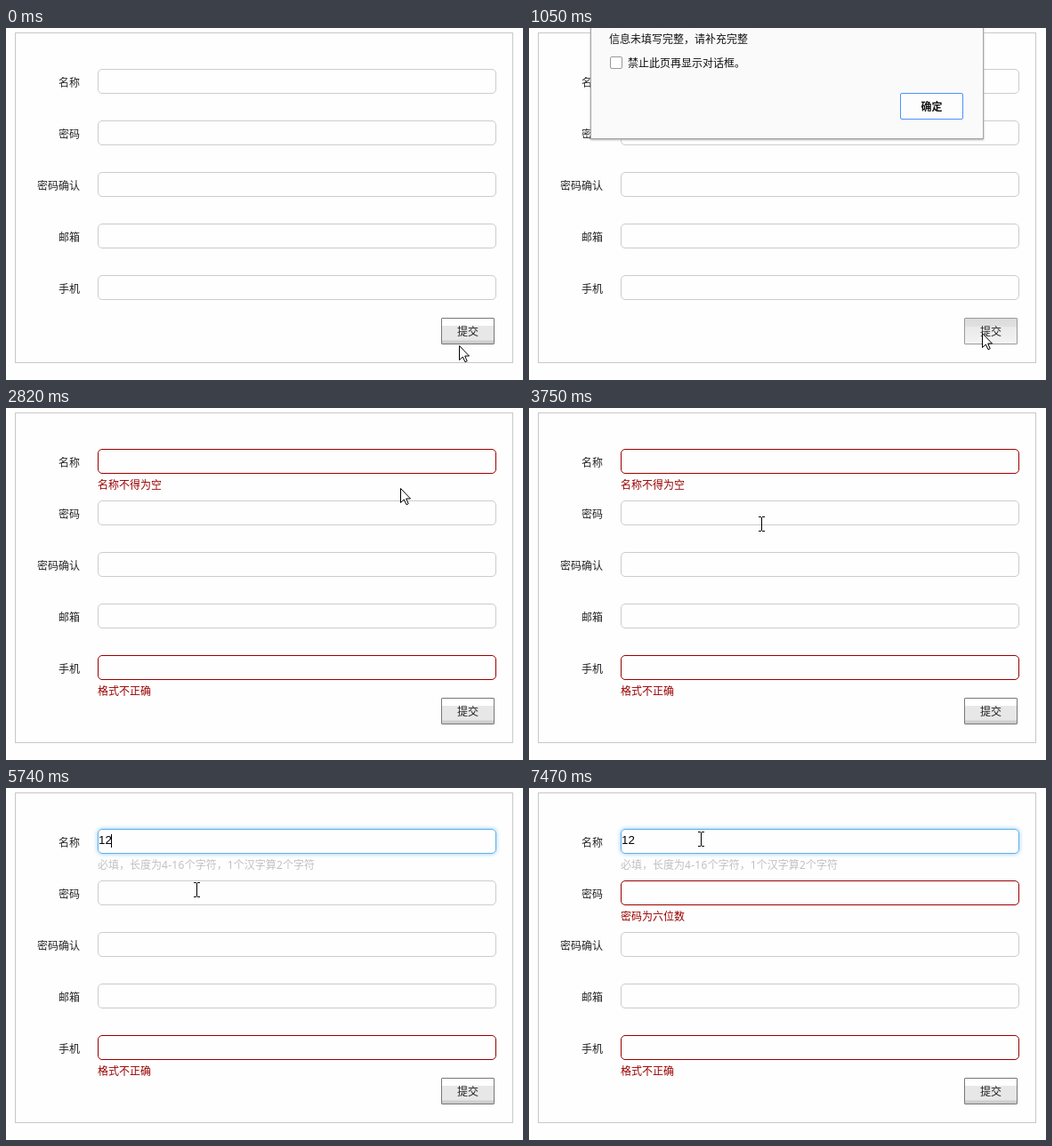
Write an HTML page that moves like this. It is 581 by 396 pixels and loops after 8000 ms.

```html
<!DOCTYPE html>
<html lang="zh-CN">
<head>
<meta charset="utf-8">
<style>
html, body { margin: 0; width: 100%; height: 100%; overflow: hidden; background: #fefefe; }
body { position: relative; font: 12px/18px "Noto Sans", "Noto Sans CJK SC", "Noto Sans CJK", sans-serif; color: #222; cursor: default; }
div, svg { position: absolute; box-sizing: border-box; white-space: nowrap; }
#panel { left: 10px; top: 5px; width: 560px; height: 372px; border: 1px solid #c8c8c8; }
.row { left: -11px; width: 581px; height: 58px; }
.label { right: 498px; top: 7px; }
.box { left: 103px; top: 0; width: 448px; height: 28px; border: 1px solid #ccc; border-radius: 5px; }
.note { left: 103px; top: 32px; }
.note span { letter-spacing: .3px; }
.error .box { border-color: #900; }
.error .note { color: #900; }
.focus .box { border-color: #5fb0ea; box-shadow: 0 0 5px #8cc8f4; }
.focus .note { color: #c0c0c0; }
.value { left: 104px; top: 5px; font: 13.33px/16px "Liberation Sans", Arial, sans-serif; color: #000; }
.caret { top: 6px; width: 1px; height: 15px; background: #000; }
#submit { left: 489px; top: 326px; width: 60px; height: 30px; border: 1px solid #777; border-radius: 1px; padding-top: 6px; text-align: center;
  background: linear-gradient(#fff 8px, #e7e7e7 8px 24px, #cdcdcd 25px); }
#submit.hover { background: linear-gradient(#fff 8px, #eee 8px 24px, #d8d8d8 25px); }
#submit.down { border-color: #999; background: linear-gradient(#dcdcdc, #e0e0e0 9px, #e9e9e9 9px, #f3f3f3); }
#dialog { left: 69px; top: -1px; width: 442px; height: 126px; border: 1px solid #a5a5a5; background: #fafafa; box-shadow: 0 1px 2px #aaa; color: #111; }
#check { left: 21px; top: 32px; width: 14px; height: 14px; border: 1px solid #999; border-radius: 2px; background: #fff; }
#ok { left: 347px; top: 73px; width: 71px; height: 30px; border: 1px solid #4d90fe; border-radius: 2px; padding-top: 6px; background: #fdfdfd; font-weight: bold; text-align: center; }
svg { left: 0; top: 0; overflow: visible; }
</style>
</head>
<body>
<div id="panel"></div>
<div id="submit">提交</div>
<div id="dialog">
  <div style="left:20px;top:4px">信息未填写完整，请补充完整</div>
  <div id="check"></div>
  <div style="left:41px;top:31px">禁止此页再显示对话框。</div>
  <div id="ok">确定</div>
</div>
<svg id="pointer" width="12" height="20">
  <path id="arrow" d="M.5.5V16.5L4.3 13 7 18.7 9.2 17.7 6.7 12H11.5Z" fill="#fff" stroke="#000"/>
  <path id="beam" d="M0 .5H3M4 .5H7M3.5 1V16M0 16.5H3M4 16.5H7" fill="none" stroke="#000"/>
</svg>
<script>
// All moments are counted in ticks, 60 to a loop
const LOOP = 8000, TICK = LOOP / 60, LEAD = 20;
const HOVER = 2, PRESS = 6, ALERT = 7, DISMISS = 20, RELEASE = 21;
const FOCUS_NAME = 29, TYPE = 41, FOCUS_PASS = 45, REFOCUS_NAME = 52;
const BLINK = 4, BEAM = 27;

const $ = id => document.getElementById(id);
const show = (el, on) => el.style.display = on ? '' : 'none';
const add = (parent, cls, text = '') => {
  const el = document.createElement('div');
  el.className = cls;
  el.textContent = text;
  return parent.appendChild(el);
};

const fields = [
  { label: '名称', hint: '必填，长度为4-16个字符，1个汉字算2个字符', checked: DISMISS,
    problem: value => value ? '名称在4-12个字符之间' : '名称不得为空' },
  { label: '密码', hint: '必填，长度为6个字符，必须包含数字和大小写字符', checked: FOCUS_PASS,
    problem: () => '密码为六位数' },
  { label: '密码确认' },
  { label: '邮箱' },
  { label: '手机', checked: DISMISS, problem: () => '格式不正确' }
];
fields.forEach((field, i) => {
  field.el = add($('panel'), 'row');
  field.el.style.top = 40 + 58 * i + 'px';
  add(field.el, 'label', field.label);
  for (const part of ['box', 'value', 'caret', 'note']) field[part] = add(field.el, part);
});

// Pointer way points: tick, x, y
const path = [
  [0, 509, 357], [3, 509, 343], [9, 509, 343], [11, 466, 139], [15, 442, 90], [23, 443, 90],
  [26, 340, 261], [29, 217, 53], [33, 217, 53], [35, 211, 74], [40, 211, 76], [43, 211, 106],
  [47, 210, 110], [50, 190, 49], [60, 190, 49]
];
function pointerAt(n) {
  const i = path.findIndex(p => p[0] > n);
  const [t0, x0, y0] = path[i - 1], [t1, x1, y1] = path[i];
  const mix = (a, b) => Math.round(a + (b - a) * (n - t0) / (t1 - t0));
  return [mix(x0, x1), mix(y0, y1)];
}

function drawField(field, n, value, focused, blinkFrom) {
  const error = !focused && n >= field.checked;
  const note = focused ? field.hint : error ? field.problem(value) : '';
  field.el.className = 'row ' + (focused ? 'focus' : error ? 'error' : '');
  field.note.innerHTML = note.replace(/[\d-]+/g, '<span>$&</span>');
  field.value.textContent = value;
  field.caret.style.left = 104 + 7 * value.length + 'px';
  show(field.caret, focused && Math.floor((n - blinkFrom) / BLINK) % 2 === 0);
}

function draw(n) {
  const typed = '12'.slice(0, Math.max(0, n - TYPE + 1));
  const active = n < FOCUS_NAME ? -1 : n >= FOCUS_PASS && n < REFOCUS_NAME ? 1 : 0;
  const blinkFrom = [FOCUS_NAME, TYPE, TYPE + 1, FOCUS_PASS, REFOCUS_NAME].filter(t => t <= n).pop();
  fields.forEach((field, i) => drawField(field, n, i ? '' : typed, i === active, blinkFrom));

  $('submit').className = n < HOVER || n >= RELEASE ? '' : n < PRESS ? 'hover' : 'down';
  show($('dialog'), n >= ALERT && n < DISMISS);

  const [x, y] = pointerAt(n);
  $('pointer').style.transform = `translate(${x}px, ${y}px)`;
  show($('arrow'), n < BEAM);
  show($('beam'), n >= BEAM);
}

const start = performance.now();
function tick() {
  const t = (performance.now() - start) % LOOP;
  draw(Math.min(59, Math.floor((t + LEAD) / TICK)));
  requestAnimationFrame(tick);
}
tick();
</script>
</body>
</html>
```
